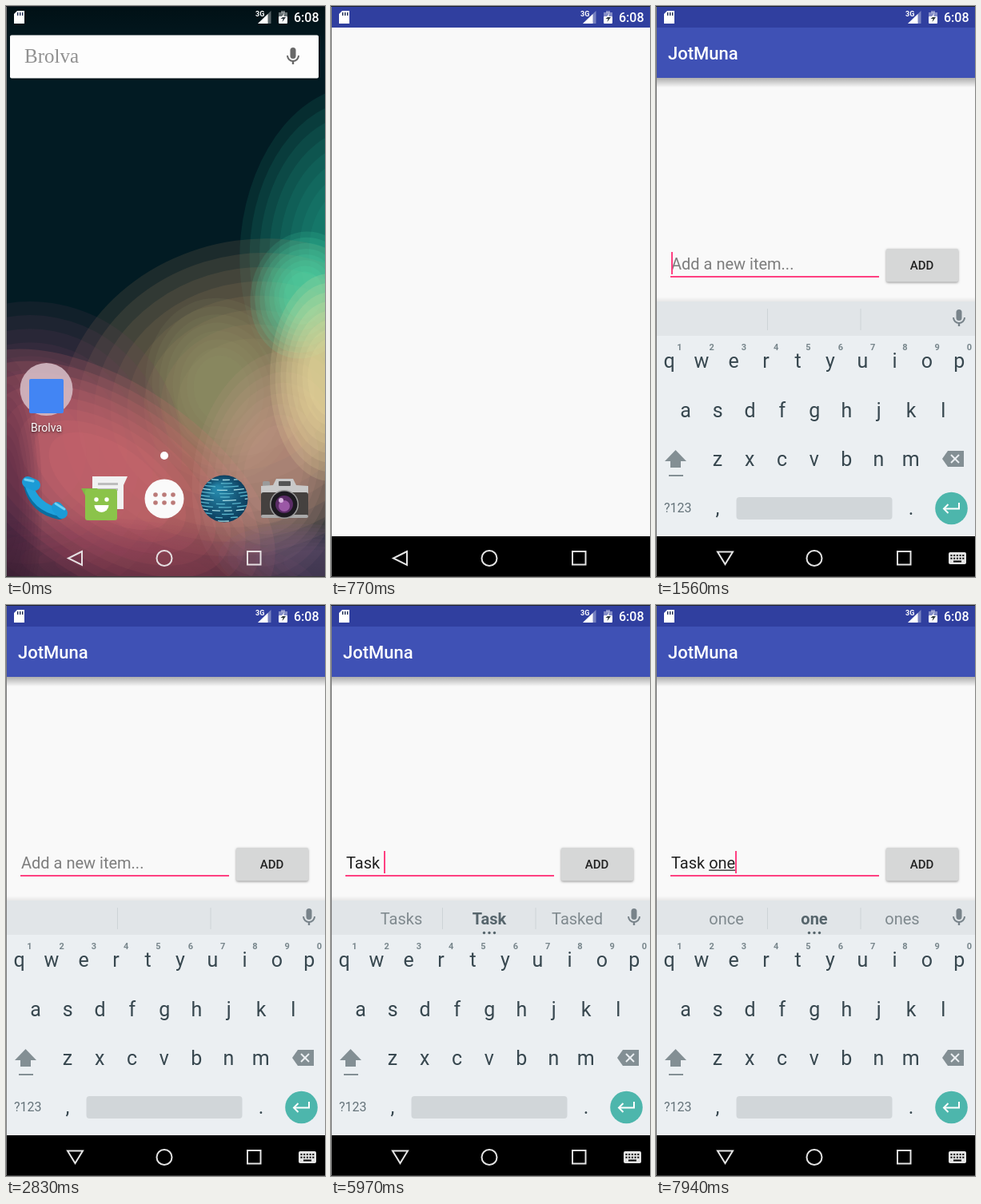
Write an HTML page with a canvas that moves like this. It is 399 px wide and 715 px high and loops after 8 s.

```html
<!DOCTYPE html>
<html lang="en">
<head>
<meta charset="utf-8">
<style>
html, body { margin: 0; width: 100%; height: 100%; overflow: hidden; background: #000; }
canvas { display: block; width: 399px; height: 715px; }
</style>
</head>
<body>
<canvas id="stage" width="399" height="715"></canvas>
<script>
const c = document.getElementById('stage').getContext('2d');
const W = 399, H = 715, LOOP = 8000;
const PINK = '#ff4081', INK = '#37474f';

// ---- drawing helpers ----
function rect(x, y, w, h, fill, r = 0) {
  c.fillStyle = fill;
  c.beginPath();
  c.roundRect(x, y, w, h, r);
  c.fill();
}
function disc(x, y, r, fill) {
  c.fillStyle = fill;
  c.beginPath();
  c.arc(x, y, r, 0, 7);
  c.fill();
}
function poly(fill, ...p) {
  c.fillStyle = fill;
  c.beginPath();
  for (let i = 0; i < p.length; i += 2) c.lineTo(p[i], p[i + 1]);
  c.closePath();
  c.fill();
}
function stroke(color, width, path) {
  c.strokeStyle = color;
  c.lineWidth = width;
  c.beginPath();
  path();
  c.stroke();
}
function line(color, width, ...p) {
  stroke(color, width, () => {
    for (let i = 0; i < p.length; i += 2) c.lineTo(p[i], p[i + 1]);
  });
}
function text(s, x, y, size, fill, weight = 400, align = 'left', family = 'Roboto, sans-serif') {
  c.font = `${weight} ${size}px ${family}`;
  c.textAlign = align;
  c.fillStyle = fill;
  c.fillText(s, x, y);
}
function fade(y, h, from, to) {
  const g = c.createLinearGradient(0, y, 0, y + h);
  g.addColorStop(0, from);
  g.addColorStop(1, to);
  rect(0, y, W, h, g);
}
function shadowed(color, blur, dy, draw) {
  c.save();
  c.shadowColor = color;
  c.shadowBlur = blur;
  c.shadowOffsetY = dy;
  draw();
  c.restore();
}

// ---- shared system parts ----
function mic(x, y, color) {
  rect(x - 3.5, y - 11, 7, 14, color, 3.5);
  stroke(color, 2, () => c.arc(x, y - 1, 7, 0, Math.PI));
  line(color, 2.4, x, y + 6, x, y + 10);
}
function statusIcons() {
  poly('#fff', 14, 6, 23, 6, 23, 22, 10, 22, 10, 10);
  for (const x of [14, 17, 20]) rect(x, 8, 1.4, 4, '#1b2a50');
  text('3G', 312, 13, 9, '#fff', 700);
  poly('rgba(255,255,255,.35)', 331.5, 6, 331.5, 22, 315, 22);
  poly('#fff', 327.5, 10, 327.5, 22, 315, 22);
  rect(344, 6, 5, 3, 'rgba(255,255,255,.4)');
  rect(341, 8, 11, 6, 'rgba(255,255,255,.4)');
  rect(341, 13, 11, 9, '#fff', 1);
  poly('#fff', 348, 9, 344, 15, 347, 15);
  poly('#28343c', 346, 14, 350, 14, 345.5, 20, 346.5, 16, 343.5, 16);
  text('6:08', 360, 20, 16, '#fff', 500);
}
function navIcons(color, width, keyboardOpen) {
  stroke(color, width, () => {
    if (keyboardOpen) { c.moveTo(77, 683.5); c.lineTo(96, 683.5); c.lineTo(86.5, 699); }
    else { c.moveTo(95, 683); c.lineTo(78, 691.5); c.lineTo(95, 700); }
    c.closePath();
  });
  stroke(color, width, () => c.arc(198, 691.5, 9.5, 0, 7));
  stroke(color, width, () => c.rect(302, 683, 16.5, 16.5));
  if (!keyboardOpen) return;
  rect(366, 684, 22, 15, color, 2);
  for (let i = 0; i < 10; i++) rect(368.5 + (i % 5) * 3.7, 687 + (i > 4) * 3.7, 2, 2, '#000');
  rect(372, 694.5, 10, 2, '#000');
}

// ---- home screen ----
// x, y, rx, ry, rotation, layer opacity, colour: stacked in steps for a banded glow
const GLOWS = [
  [430, 300, 137, 200, .1, .13, '#1fa48c'],
  [300, 490, 235, 195, -.3, .17, '#9c7f5c'],
  [270, 480, 95, 115, -.2, .1, '#8f9c70'],
  [30, 560, 190, 190, 0, .13, '#74425e'],
  [130, 595, 235, 122, .59, .17, '#dc6c74'],
  [335, 580, 100, 150, .2, .1, '#d89890'],
  [372, 362, 66, 80, .2, .13, '#4ee8ae'],
  [405, 465, 75, 130, 0, .15, '#f2e2a4'],
  [150, 705, 240, 62, .1, .09, '#a04468'],
  [395, 700, 130, 50, .1, .1, '#8c6496'],
  [0, 620, 45, 180, 0, .1, '#4a2440']
];
function wallpaper() {
  rect(0, 0, W, H, '#021b23');
  for (const [x, y, rx, ry, turn, alpha, color] of GLOWS) {
    c.globalAlpha = alpha;
    c.fillStyle = color;
    for (let k = 1; k > .3; k -= .09) {
      c.beginPath();
      c.ellipse(x, y, rx * k, ry * k, turn, 0, 7);
      c.fill();
    }
  }
  c.globalAlpha = 1;
  fade(0, 60, 'rgba(0,0,0,.4)', 'rgba(0,0,0,0)');
  fade(640, 75, 'rgba(0,0,0,0)', 'rgba(0,0,0,.2)');
}
function phoneIcon() {
  c.lineCap = 'round';
  const curve = () => { c.moveTo(28, 598); c.quadraticCurveTo(36, 628, 68, 634); };
  stroke('#0b6ea0', 12, () => { c.moveTo(28, 600); c.quadraticCurveTo(35, 631, 67, 637); });
  stroke('#1fa2dc', 10, curve);
  line('#1b9bd6', 14, 27, 596, 36, 600);
  line('#1b9bd6', 14, 64, 628, 70, 635);
  line('#6fd0f4', 3, 24, 593, 34, 595);
  line('#6fd0f4', 3, 62, 623, 73, 630);
  c.lineCap = 'butt';
}
function messageIcon() {
  poly('#f1f1f1', 152, 589, 108, 589, 108, 630, 147, 630, 147, 600);
  rect(115, 597, 25, 3, '#bdbdbd');
  rect(115, 604, 25, 3, '#bdbdbd');
  poly('#7fb846', 94, 604, 115, 604, 104, 622);
  rect(99, 605, 40, 39, '#8bc34a', 3);
  disc(113, 618, 2.7, '#fff');
  disc(126, 618, 2.7, '#fff');
  c.fillStyle = '#fff';
  c.beginPath();
  c.arc(119.5, 625, 9, 0, Math.PI);
  c.fill();
}
function globeIcon() {
  c.save();
  const g = c.createRadialGradient(264, 605, 4, 273, 617, 30);
  g.addColorStop(0, '#2585a8');
  g.addColorStop(1, '#0c3c5c');
  disc(273, 617, 29.5, g);
  c.clip();
  for (let i = 0; i < 13; i++) {
    const y = 591 + i * 4.3;
    c.setLineDash([9 + i * 5 % 11, 5 + i * 7 % 9]);
    stroke(i % 3 ? '#59b4cc' : '#a5dbe4', 1.3, () => {
      c.moveTo(243, y);
      c.quadraticCurveTo(273, y + 5, 303, y);
    });
  }
  c.restore();
}
function cameraIcon() {
  rect(321, 595, 9, 8, '#9a9a9a', 2);
  poly('#c9c9c9', 319, 601, 334, 600, 338, 592, 359, 592, 363, 600, 378, 601, 378, 612, 319, 612);
  rect(319, 609, 59, 32, '#45413f', 3);
  rect(319, 637, 59, 4, '#aaa', 2);
  rect(341, 595, 15, 6, '#555', 1);
  disc(348, 624, 18, '#9b9b9b');
  disc(348, 624, 16.5, '#1c1a20');
  disc(348, 624, 11, '#5a2c66');
  disc(348, 626, 7, '#9b58a6');
  disc(344, 619, 3, '#d9b5e0');
}
function home(navColor) {
  wallpaper();
  statusIcons();
  shadowed('rgba(0,0,0,.5)', 3, 1, () => rect(5, 36.5, 386, 54, '#fdfdfd', 2));
  text('Brolva', 23, 71, 25, '#919191', 400, 'left', '"Liberation Serif", serif');
  mic(359, 63, '#686868');
  disc(50.5, 480, 33, 'rgba(214,190,198,.88)');
  rect(29, 467, 43, 43, '#4285f4', 2);
  shadowed('rgba(0,0,0,.7)', 3, 1, () => text('Brolva', 50.5, 533, 14, '#fff', 400, 'center'));
  disc(198, 563, 5, '#fff');
  phoneIcon();
  messageIcon();
  disc(198, 617, 24.5, '#fafafa');
  for (let i = 0; i < 6; i++) disc(187 + (i % 3) * 11, 612 + (i > 2) * 10, 2.8, '#bb7a78');
  globeIcon();
  cameraIcon();
  navIcons(navColor, 2, false);
}

// ---- app ----
function appContent(shift, typed, cursorOn) {
  fade(90, 12, 'rgba(0,0,0,.3)', 'rgba(0,0,0,0)');
  rect(0, 27, W, 63, '#3f51b5');
  text('JotMuna', 15, 67, 22, '#fff', 500);
  c.save();
  c.translate(0, shift);
  text(typed || 'Add a new item...', 19, 330, 20, typed ? '#212121' : '#7d7d7d');
  const end = c.measureText(typed).width;
  const wordStart = c.measureText(typed.slice(0, typed.lastIndexOf(' ') + 1)).width;
  if (end > wordStart) rect(19 + wordStart, 331.5, end - wordStart, 1.2, '#212121');
  rect(18, 338, 261, 2, PINK);
  if (cursorOn) rect(Math.round(18.6 + end), 308, 2, 28, PINK);
  shadowed('rgba(0,0,0,.4)', 3, 1, () => rect(288, 304, 90, 41.5, '#d6d7d7', 2));
  text('ADD', 332.5, 330, 15, '#202020', 500, 'center');
  c.restore();
}
function keyRow(letters, x, y) {
  [...letters].forEach((k, i) => text(k, x + i * 40.3, y, 25, INK, 400, 'center'));
}
function keyboard(words) {
  fade(364, 6, 'rgba(0,0,0,0)', 'rgba(0,0,0,.07)');
  rect(0, 370, W, 43, '#e1e5e8');
  rect(0, 413, W, 251, '#ebeff2');
  rect(139, 379, 1, 27, '#cdd3d6');
  rect(255.5, 379, 1, 27, '#cdd3d6');
  mic(379, 391, '#78838a');
  if (words) {
    words.split(' ').forEach((word, i) =>
      text(word, 88 + 110 * i, 400, 20, i === 1 ? '#56656c' : '#7f898e', i === 1 ? 700 : 400, 'center'));
    for (const x of [191.5, 198, 204.5]) disc(x, 410.5, 1.7, '#56656c');
  }
  keyRow('qwertyuiop', 16.5, 453);
  [...'1234567890'].forEach((n, i) => text(n, 29.3 + i * 40.3, 431, 11, '#78868c', 700, 'center'));
  keyRow('asdfghjkl', 37, 515);
  keyRow('zxcvbnm', 77, 576);
  poly('#838f94', 24.5, 556, 38, 570, 31, 570, 31, 578, 18, 578, 18, 570, 11, 570);
  rect(16, 587, 18, 2, '#838f94');
  poly('#838f94', 358, 567, 365, 557, 385, 557, 385, 577, 365, 577);
  line('#ebeff2', 2, 369, 562, 379, 572);
  line('#ebeff2', 2, 379, 562, 369, 572);
  text('?123', 10, 634, 16, '#65737a');
  text(',', 77, 637, 25, INK, 400, 'center');
  text('.', 319, 637, 25, INK, 400, 'center');
  rect(100.5, 615, 195, 28, '#d1d6d9', 4);
  disc(369.5, 629, 20.3, '#4db6ac');
  line('#fff', 2, 379, 622, 379, 629.5, 360, 629.5);
  line('#fff', 2, 365.5, 624, 360, 629.5, 365.5, 635);
}

// ---- timeline ----
const TYPING = [
  [0, '', ''],
  [5190, 'T', ''],
  [5340, 'T', 'The T To'],
  [5460, 'Ta', 'The T To'],
  [5580, 'Ta', 'Ya Ta Take'],
  [5730, 'Tas', 'Was Tas Task'],
  [5850, 'Task', 'Tasks Task Tasked'],
  [5970, 'Task ', 'Tasks Task Tasked'],
  [6120, 'Task ', ''],
  [6270, 'Task o', ''],
  [6420, 'Task o', 'I o of'],
  [6570, 'Task on', 'in on one'],
  [6690, 'Task one', 'in on one'],
  [6810, 'Task one', 'once one ones']
];
const BLINKS = [1680, 2270, 2830, 3230, 3740, 4260, 4660, 5190, 7370, 7790];

function openingWindow(top) {
  rect(0, top, W, H - top, '#f9f9f9');
  rect(0, top, W, 27, '#303f9f');
}
function app(t) {
  openingWindow(0);
  const [, typed, words] = TYPING.findLast(step => t >= step[0]);
  const cursorOn = BLINKS.filter(b => t >= b).length % 2 === 0;
  const started = t >= 1320, keysUp = t >= 1440;
  if (started) {
    c.globalAlpha = keysUp ? 1 : .93;
    appContent(keysUp ? 0 : 295, typed, cursorOn);
    c.globalAlpha = 1;
  }
  if (keysUp) {
    const rising = t < 1560;
    c.save();
    c.globalAlpha = rising ? .8 : 1;
    c.translate(0, rising ? 30 : 0);
    keyboard(words);
    c.restore();
  }
  rect(0, 664, W, 51, '#000');
  navIcons('#e4e4e4', 2, started);
  statusIcons();
}
function render(t) {
  if (t < 770) {
    home('#e6dfe2');
    if (t >= 500) {
      openingWindow(t < 650 ? 136 : 28);
      navIcons('#e6e6e6', 1, false);
    }
  } else app(t);
  rect(0, 0, 1, H, '#808080');
  rect(0, 0, W, 1, '#20242c');
  rect(0, 714, W, 1, '#3a3a3a');
}
function tick(now) {
  render(now % LOOP);
  requestAnimationFrame(tick);
}
requestAnimationFrame(tick);
</script>
</body>
</html>
```
